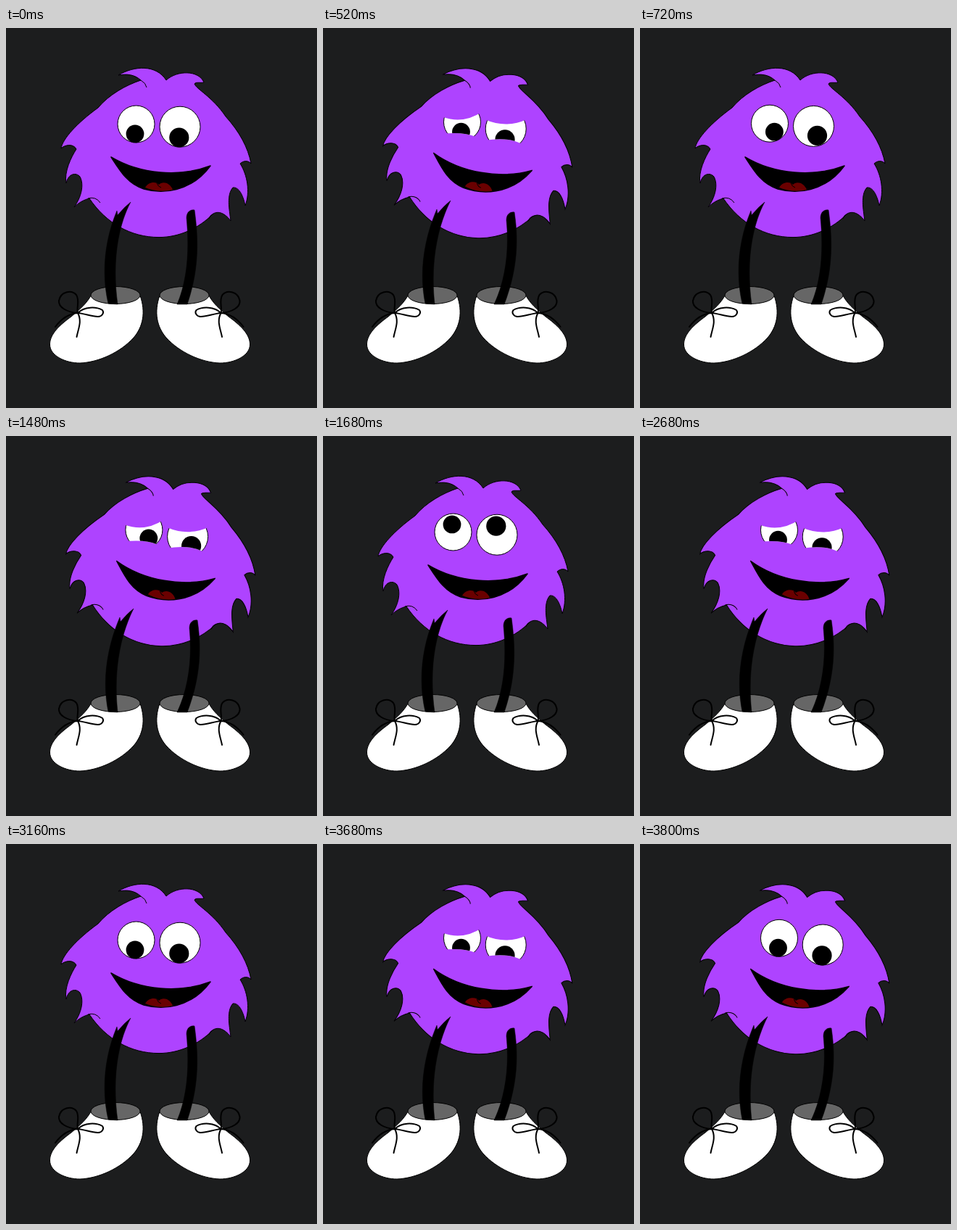
An HTML page for the animation above (3.88 s loop, 429 by 524 pixels).

```html
<!DOCTYPE html>
<html lang="en">
<head>
<meta charset="utf-8">
<title>Furry monster</title>
<style>
  html, body { margin: 0; width: 100%; height: 100%; overflow: hidden; background: #1c1d1e; }
  svg { display: block; width: 100%; height: 100%; }
  .line { fill: none; stroke: #000; stroke-width: 1; }
  .lace { fill: none; stroke: #000; stroke-width: 2; stroke-linecap: round; }
</style>
</head>
<body>
<svg viewBox="0 0 429 524">
  <defs>
    <clipPath id="lid0"><path d="M-27 -7Q2 3 27 -14V22L18 20Q2 13 -27 16Z"/></clipPath>
    <clipPath id="lid1"><path d="M-29 -13Q0 0 29 -13V24L20 20Q2 11 -29 16Z"/></clipPath>
    <g id="shoe">
      <path d="M117 369C112 379 102 388 90 398C75 409 60 422 60.500 437C61 452 82 462 102 462C128 461 158 447 176 427C189 412 193 392 185 369Z" fill="#fff" stroke="#000"/>
      <ellipse cx="151" cy="368.500" rx="34" ry="12" fill="#666" stroke="#000"/>
    </g>
    <path id="lace" class="lace" d="M99 393C84 392 72 385 73 376C75 364 90 360 97 368C102 376 97 385 99 393C86 394 77 400 68 412M99 393C105 404 100 414 97.500 426M99 393C108 384 124 384 133 389C136 393 132 398 127 398C117 398 110 394 99 393"/>
  </defs>
  <rect width="429" height="524" fill="#1c1d1e"/>
  <g id="body">
    <path fill="#ae43ff" stroke="#000" d="M155 65C177 52 207 50 221 72C236 58 266 58 273 75C268 76 262 74 260 77C262 84 285 95 303 122C322 143 334 165 338 187C334 182 327 183 323 187C333 203 337 226 330 245C327 230 321 219 313 220C304 230 308 250 310 266C304 258 295 251 286 256C265 277 238 288.600 211 288.600C172 288.600 138 269 115 235C107 237 100 241 94 247C104 233 108 216 102 205C97 199 86 200 83 214C80 198 90 178 97 167C93 159 81 161 76 166C78 153 98 131 127 110C142 92 165 79 186 72C177 64 167 63 155 65Z"/>
    <path class="line" d="M113 235Q124 232 130 241M186 72Q193 76 194 82M286 256Q281 258 280 263"/>
  </g>
  <g id="mouth">
    <path d="M145 178C185 202 240 206 282 190C255 227 215 229 190 222C168 215 158 198 145 178Z" stroke="#000" stroke-width="1.500" stroke-linejoin="round"/>
    <path d="M192 220C196 212 207 211 211 216C216 211 226 213 230 223C218 226 204 225 192 220Z" fill="#6a0000"/>
    <path class="line" d="M208 214Q210 219 214 220"/>
  </g>
  <g id="eyes"></g>
  <use href="#shoe"/>
  <use href="#shoe" transform="matrix(-1 0 0 1 397 0)"/>
  <use href="#lace"/>
  <use href="#lace" transform="matrix(-1 0 0 1 395.500 0)"/>
  <path id="legs" stroke="#000" stroke-width=".5"/>
</svg>
<script>
const LOOP = 3880;
const $ = id => document.getElementById(id);

// Eye centres upright and leaning, radii of white and pupil
const EYES = [
  { up: [179.5, 132.5], lean: [192, 129.8], r: 25.5, pupil: 12.4 },
  { up: [240, 136.2], lean: [252.2, 139], r: 28, pupil: 13.6 }
];

// Pupil offsets for each eye
const LOOKS = {
  down: [[-1.5, 13.4], [-1.2, 14.8]],
  right: [[6.4, 11.5], [5, 13]],
  above: [[-1.5, -10.6], [-1.2, -12]]
};

// Each cycle: upright, lean, blink, upright again
const CYCLES = [
  { start: 0, lean: 160, reopen: 600, look: 'down' },
  { start: 720, lean: 1120, reopen: 1560, look: 'right' },
  { start: 1680, lean: 2320, reopen: 3040, look: 'above', drop: 2160 },
  { start: 3160, lean: 3320, reopen: 3760, look: 'down' }
];

function stateAt(t) {
  let i = CYCLES.length - 1;
  while (CYCLES[i].start > t) i--;
  const c = CYCLES[i], shut = c.lean + 360;
  let look = t >= c.drop ? 'down' : c.look;
  if (t >= c.reopen) look = CYCLES[(i + 1) % CYCLES.length].look;
  let lid = 'open';
  if (t >= shut && t < c.reopen + 40)
    lid = t >= shut + 40 && t < c.reopen ? 'closed' : 'half';
  return { lean: t >= c.lean, lid, look };
}

function drawEye(eye, i, s) {
  let [x, y] = s.lean ? eye.lean : eye.up;
  if (s.look === 'right') {
    x -= s.lean ? 1.6 : 0.5;
    y -= s.lean ? 0.3 : 0.8;
  }
  const at = `<g transform="translate(${x} ${y})"`;
  if (s.lid === 'closed') {
    const w = eye.r;
    return `${at}><path class="line" d="M${-w - 3} 4Q0 18 ${w} 4"/></g>`;
  }
  const clip = s.lid === 'half' ? ` clip-path="url(#lid${i})"` : '';
  const [px, py] = LOOKS[s.look][i];
  return `${at}${clip}><circle r="${eye.r}" fill="#fff" stroke="#000"/>` +
    `<circle cx="${px}" cy="${py}" r="${eye.pupil}"/></g>`;
}

// Feet stay planted while the hips move
function legPath(k) {
  const p = (x, y, w, dy = 0) => `${x + 4 * w * k} ${y + dy * k} `;
  return 'M' + p(172, 240, 1, -2) +
    'C' + p(157, 268, 1) + p(145, 316, .5) + p(154, 381, 0) +
    'L' + p(141, 380, 0) +
    'C' + p(131, 336, .3) + p(137, 290, .7) + p(153, 252, 1, -2) +
    'L' + p(154, 258, 1, -2) +
    'Q' + p(163, 247, 1, -2) + p(172, 240, 1, -2) +
    'ZM' + p(249, 262, 1, 3) +
    'C' + p(249, 254, 1, 3) + p(254, 250, 1, 3) + p(260, 251, 1, 3) +
    'C' + p(267, 300, 1) + p(264, 340, .4) + p(250, 381, 0) +
    'L' + p(236, 381, 0) +
    'C' + p(251, 346, .4) + p(253, 304, 1) + p(249, 262, 1, 3) + 'Z';
}

let shown = '';
function render(t) {
  const s = stateAt(t), key = Object.values(s).join();
  if (key === shown) return;
  shown = key;
  $('body').setAttribute('transform', s.lean ? 'rotate(1.86 180 370)' : '');
  $('mouth').setAttribute('transform', s.lean ? 'rotate(5 212 264)' : '');
  $('legs').setAttribute('d', legPath(+s.lean));
  $('eyes').innerHTML = EYES.map((eye, i) => drawEye(eye, i, s)).join('');
}

const begin = performance.now();
function tick() {
  render((performance.now() - begin) % LOOP);
  requestAnimationFrame(tick);
}
tick();
</script>
</body>
</html>
```
